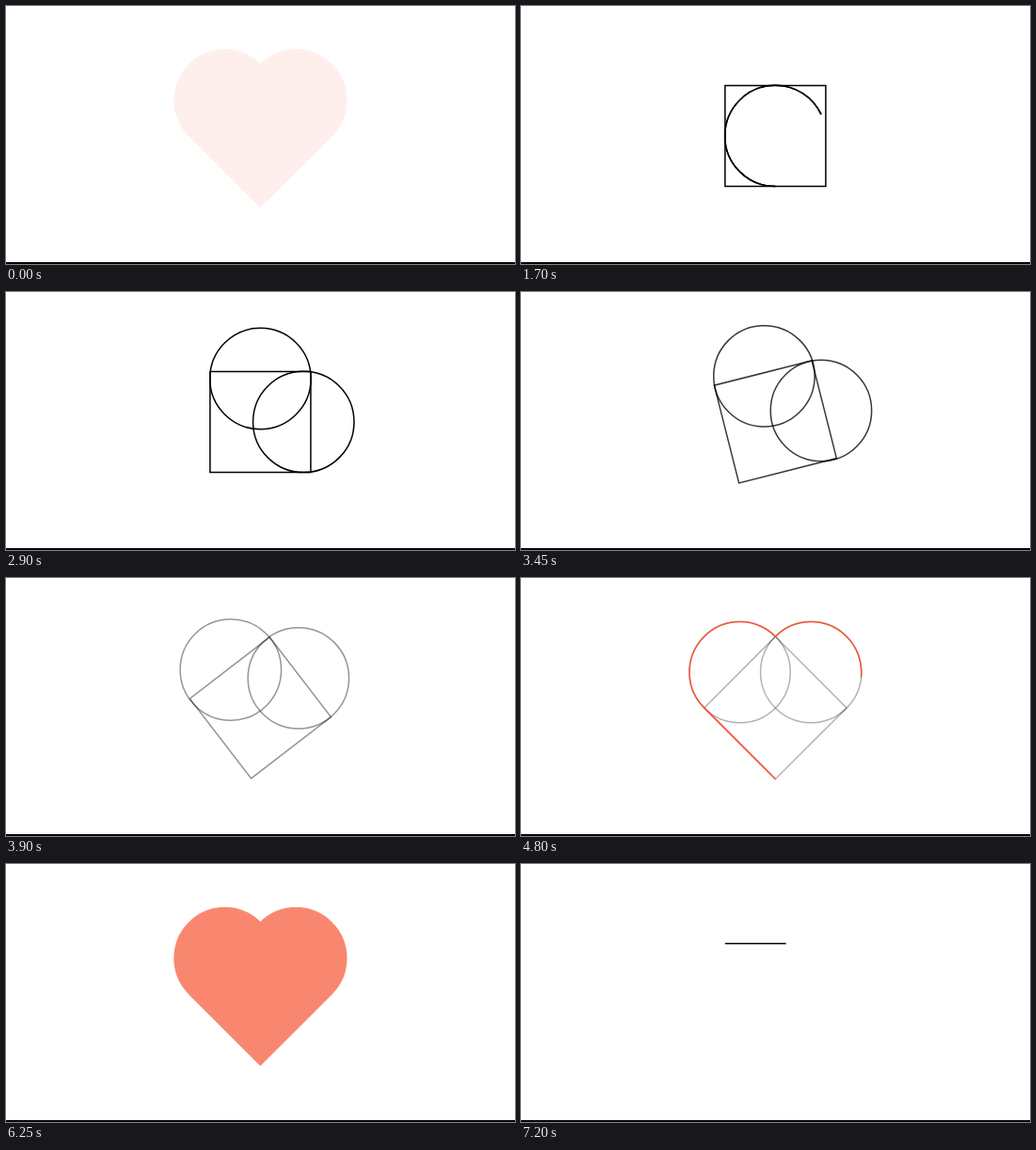
An HTML page for the animation above (7.25 s loop, 541 by 274 pixels).

```html
<!DOCTYPE html>
<html lang="en">
<head>
<meta charset="utf-8">
<title>Heart from a square and two circles</title>
<style>
  html, body { margin: 0; width: 100%; height: 100%; overflow: hidden; background: #fff; }
  svg { display: block; width: 541px; height: 274px; }
  .line { fill: none; stroke: #000; stroke-width: 1.5; }
  #heart { stroke: rgb(247, 86, 52); stroke-width: 1.5; }
</style>
</head>
<body>
<svg viewBox="0 0 541 274">
  <rect y="272" width="541" height="2"/>
  <g transform="translate(270.4 137.9)">
    <path id="square" class="line" pathLength="1"/>
    <path id="top" class="line" pathLength="1"/>
    <path id="side" class="line" pathLength="1"/>
    <path id="heart" pathLength="1"/>
  </g>
</svg>
<script>
const LOOP = 7250, STEP = 50, PHASE = 1000;
const HALF = 53.5, R = 53.7, DIAG = HALF * Math.SQRT2;
const COLOR = [247, 86, 52];
const START = { square: 206, circle: 1204, move: 2217, turn: 3245, outline: 4248, fill: 5252, fade: 6059 };

const [square, top_, side, heart] =
  ["square", "top", "side", "heart"].map(id => document.getElementById(id));

square.setAttribute("d", `M${-HALF} ${-HALF}H${HALF}V${HALF}H${-HALF}Z`);
const ring = `M0 ${R}A${R} ${R} 0 0 1 0 ${-R}A${R} ${R} 0 0 1 0 ${R}Z`;
top_.setAttribute("d", ring);
side.setAttribute("d", ring);
heart.setAttribute("d",
  `M0 ${DIAG}L${-DIAG} 0A${HALF} ${HALF} 0 0 1 0 ${-DIAG}A${HALF} ${HALF} 0 0 1 ${DIAG} 0Z`);

// cubic-bezier(0, 0, .58, 1)
function easeOut(x) {
  if (x <= 0) return 0;
  if (x >= 1) return 1;
  let lo = 0, hi = 1;
  for (let i = 0; i < 24; i++) {
    const u = (lo + hi) / 2;
    if (1.74 * u * u * (1 - u) + u ** 3 < x) lo = u; else hi = u;
  }
  return lo * lo * (3 - 2 * lo);
}

// Steps in time, with the holds around the fade and the restart.
function sceneTime(ms) {
  const t = Math.floor(ms / STEP) * STEP;
  if (t < 150) return 6820;
  if (t < 300) return 0;
  if (t >= 5950 && t < 6150) return 5950;
  if (t >= 7200) return 300;
  if (t >= 7000) return 0;
  return Math.min(t, 6800);
}

function trace(path, p) {
  path.style.display = p > 0 ? "" : "none";
  path.style.strokeDasharray = p < 1 ? `${p} 2` : "none";
}

function place(path, x, y) {
  path.setAttribute("transform", `translate(${x} ${y})`);
}

function draw(t) {
  const at = name => easeOut((t - START[name]) / PHASE);
  const move = at("move"), turn = at("turn"), fill = at("fill"), fade = at("fade");
  const lines = fade > 0 ? 0 : 1 - 0.7 * turn;

  trace(square, at("square"));
  trace(top_, at("circle"));
  trace(side, at("circle"));
  trace(heart, at("outline"));

  // The circles cut straight across while the square turns.
  const near = HALF * Math.SQRT1_2 * turn;
  const far = HALF * (move - turn) + near;
  place(top_, -near, -far);
  place(side, far, -near);
  square.setAttribute("transform", `rotate(${-45 * turn})`);
  for (const el of [square, top_, side]) el.style.strokeOpacity = lines;

  heart.style.fill = `rgba(${COLOR.map(c => Math.round(c * fill))}, ${fill})`;
  heart.style.opacity = 1 - fade;
}

const begin = performance.now();
function tick() {
  draw(sceneTime((performance.now() - begin) % LOOP));
  requestAnimationFrame(tick);
}
tick();
</script>
</body>
</html>
```
